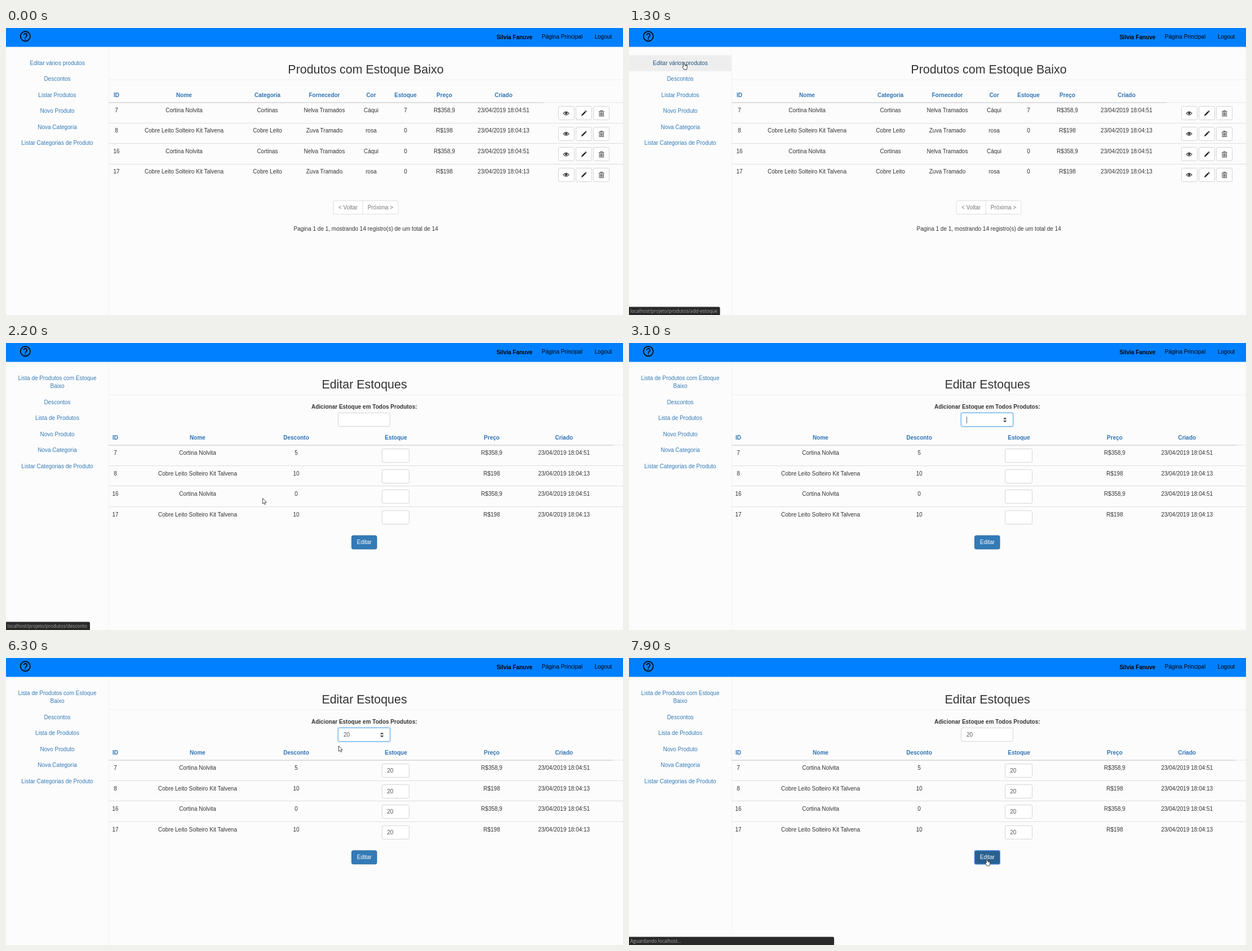
An HTML page that plays this animation: 1095 by 511 pixels, repeating every 8000 ms.

```html
<!DOCTYPE html>
<html lang="pt-BR">
<head>
<meta charset="utf-8">
<title>Estoque</title>
<style>
  html, body { margin: 0; width: 100%; height: 100%; overflow: hidden; background: #fcfcfc; }
  svg { display: block; }
  text { font: 10px "Liberation Sans", Arial, sans-serif; fill: #333; text-anchor: middle; }
  .bold { font-weight: bold; }
  .link { fill: #337ab7; }
  .head { font-weight: bold; fill: #2e74b5; }
  .nav { fill: #000; }
  .title { font-size: 21.43px; }
  .muted { fill: #777; }
  .value { fill: #555; }
  .left { text-anchor: start; }
  .status { font: 8.22px "Open Sans", "Noto Sans", sans-serif; fill: #a6a6a6; text-anchor: start; }
</style>
</head>
<body>
<svg id="stage" width="1095" height="511" viewBox="0 0 1095 511"></svg>
<script>
const LOOP = 8000, STEP = 100, PITCH = 36.5;
const stage = document.getElementById('stage');

function add(parent, tag, attrs, content) {
  const node = document.createElementNS('http://www.w3.org/2000/svg', tag);
  for (const key in attrs) node.setAttribute(key, attrs[key]);
  if (content !== undefined) node.textContent = content;
  parent.appendChild(node);
  return node;
}
const group = (parent, attrs = {}) => add(parent, 'g', attrs);
const rect = (parent, x, y, width, height, attrs) =>
  add(parent, 'rect', { x, y, width, height, ...attrs });
const path = (parent, d, attrs) => add(parent, 'path', { d, ...attrs });
// y is the middle of the capitals
const label = (parent, x, y, words, cls = '') =>
  add(parent, 'text', { x, y: y + 3.6, class: cls }, words);
const box = (parent, x, y, w, h, stroke = '#d4d4d4', fill = '#fff') =>
  rect(parent, x + .5, y + .5, w - 1, h - 1, { rx: 2.6, fill, stroke });
const show = (node, on) => node.setAttribute('opacity', Number(on));
const within = (n, from, to) => n >= from && n < to;

const curtain = 'Cortina Nolvita', quilt = 'Cobre Leito Solteiro Kit Talvena';
const goods = [
  { id: 7, name: curtain, stock: 7, off: 5 },
  { id: 8, name: quilt, stock: 0, off: 10 },
  { id: 16, name: curtain, stock: 0, off: 0 },
  { id: 17, name: quilt, stock: 0, off: 10 }
].map(item => Object.assign(item, item.name === curtain
  ? { kind: 'Cortinas', maker: 'Nelva Tramados', color: 'Cáqui', price: 'R$358,9', made: '23/04/2019 18:04:51' }
  : { kind: 'Cobre Leito', maker: 'Zuva Tramado', color: 'rosa', price: 'R$198', made: '23/04/2019 18:04:13' }));

function table(parent, cols, top, ruleEnd) {
  const rule = top + 13;
  rect(parent, 182, rule, 913, 1, { fill: '#e4e4e4' });
  rect(parent, 182, rule, ruleEnd - 182, 1.3, { fill: '#d4d4d4' });
  for (const [x, title] of cols) label(parent, x, top, title, 'head');
  goods.forEach((item, i) => {
    const y = top + 27 + i * PITCH;
    if (i) rect(parent, 182, Math.round(rule + i * PITCH), 913, 1, { fill: '#dedede' });
    for (const [x, , key] of cols) if (key) label(parent, x, y, item[key]);
  });
}

function menu(parent, items, y) {
  return items.map(words => {
    const node = label(parent, 91, y, words, 'link');
    y += 28.55;
    return node;
  });
}

function heading(parent, x, words) {
  add(parent, 'text', { x, y: 81.3, class: 'title' }, words);
}

function eye(parent, x, y) {
  const g = group(parent, { transform: `translate(${x} ${y})` });
  path(g, 'M-5 0Q0-6 5 0Q0 6-5 0Z', { fill: 'none', stroke: '#222', 'stroke-width': 1.1 });
  add(g, 'circle', { cy: -.3, r: 2.1, fill: '#222' });
  add(g, 'circle', { cx: -.6, cy: -1, r: .6, fill: '#fff' });
}
function pencil(parent, x, y) {
  const g = group(parent, { transform: `translate(${x} ${y}) rotate(45)`, fill: '#222' });
  path(g, 'M-1.3-6.2H1.3V-4.6H-1.3ZM-1.3-4H1.3V3.6L0 6.6L-1.3 3.6Z');
}
function trash(parent, x, y) {
  const g = group(parent, { transform: `translate(${x} ${y})`, fill: 'none', stroke: '#333' });
  path(g, 'M-4.8-3.3H4.8M-1.6-3.5V-5H1.6V-3.5M-3.7-2.5V5H3.7V-2.5M-1.5-1.8V3.8M0-1.8V3.8M1.5-1.8V3.8',
    { 'stroke-width': .9 });
}

// Frame shared by both pages
rect(stage, 0, 0, 1095, 511, { fill: '#fcfcfc' });
const hover = rect(stage, 0, 48.3, 182, 28.6, { fill: '#eee' });
rect(stage, 0, 0, 1095, 33.6, { fill: '#0080ff' });
rect(stage, 181.5, 34, 1, 477, { fill: '#f1f1f1' });
rect(stage, 182, 91.6, 913, 1, { fill: '#eee' });
add(stage, 'circle', { cx: 34.3, cy: 14.8, r: 8.6, fill: 'none', stroke: '#000', 'stroke-width': 1.7 });
path(stage, 'M31.4 12.8a2.9 2.9 0 1 1 4.9 2.1q-2 1.4-2 2.8M34.3 18.7v1.8',
  { fill: 'none', stroke: '#000', 'stroke-width': 1.7 });
label(stage, 902.4, 16.2, 'Silvia Fanuve', 'nav bold');
label(stage, 987, 15.2, 'Página Principal', 'nav');
label(stage, 1060, 15.2, 'Logout', 'nav');

// Low stock list
const list = group(stage);
heading(list, 638.5, 'Produtos com Estoque Baixo');
const firstLink = menu(list, ['Editar vários produtos', 'Descontos', 'Listar Produtos',
  'Novo Produto', 'Nova Categoria', 'Listar Categorias de Produto'], 62)[0];
table(list, [
  [196, 'ID', 'id'], [316, 'Nome', 'name'], [464, 'Categoria', 'kind'],
  [565, 'Fornecedor', 'maker'], [648, 'Cor', 'color'], [709, 'Estoque', 'stock'],
  [778, 'Preço', 'price'], [883, 'Criado', 'made']
], 119.2, 954);
goods.forEach((item, i) => {
  const y = 152 + i * PITCH;
  [eye, pencil, trash].forEach((icon, n) => {
    const x = 994 + n * 31.4;
    box(list, Math.round(x - 14.5), Math.round(y - 12.6), 29, 25);
    icon(list, x, y);
  });
});
box(list, 580.5, 307, 116, 25, '#ddd');
rect(list, 632.5, 307.5, 1, 24, { fill: '#ddd' });
label(list, 607, 319.6, '< Voltar', 'muted');
label(list, 664.5, 319.6, 'Próxima >', 'muted');
label(list, 638.7, 357.2, 'Pagina 1 de 1, mostrando 14 registro(s) de um total de 14');

// Stock form
const form = group(stage);
heading(form, 636, 'Editar Estoques');
label(form, 91, 62, 'Lista de Produtos com Estoque', 'link');
label(form, 91, 76.3, 'Baixo', 'link');
const offLink = menu(form, ['Descontos', 'Lista de Produtos', 'Novo Produto',
  'Nova Categoria', 'Listar Categorias de Produto'], 104.9)[0];
label(form, 635.8, 113.6, 'Adicionar Estoque em Todos Produtos:', 'bold');
table(form, [
  [194, 'ID', 'id'], [340, 'Nome', 'name'], [515, 'Desconto', 'off'], [692, 'Estoque'],
  [862, 'Preço', 'price'], [990.3, 'Criado', 'made']
], 168.4, 1077);
box(form, 589, 124, 93, 25);
const ring = group(form);
for (const [grow, alpha] of [[1.6, .12], [.8, .3]])
  rect(ring, 589.5 - grow, 124.5 - grow, 92 + 2 * grow, 24 + 2 * grow,
    { rx: 3.4, fill: 'none', stroke: '#66afe9', 'stroke-width': 1.2, 'stroke-opacity': alpha });
box(ring, 589, 124, 93, 25, '#66afe9');
const values = [label(form, 599, 136.4, '', 'value left')];
goods.forEach((item, i) => {
  const y = 188 + i * PITCH;
  box(form, 667, Math.round(y), 49, 25);
  values.push(label(form, 676.3, y + 12.4, '', 'value left'));
});
const spinner = path(form, 'M664 135.7L667.2 132.4L670.4 135.7ZM664 137.9H670.4L667.2 141.2Z', { fill: '#444' });
const caret = rect(form, 599, 131, 1, 12, { fill: '#666' });
const button = box(form, 613, 342.4, 45.5, 25, '#2e6da4', '#337ab7');
const outline = rect(form, 613.2, 342.9, 45.2, 24.2, { rx: 2.4, fill: 'none', stroke: '#5b9cf0', 'stroke-width': 1.3 });
label(form, 635.8, 354.8, 'Editar').style.fill = '#fff';

// Browser status bubble
const status = group(stage);
const bubble = rect(status, -4, 496.5, 100, 20, { rx: 2.5, fill: '#292929' });
const statusText = add(status, 'text', { x: 2.3, y: 507.4, class: 'status' }, '');

// Pointers
const arrow = path(stage, 'M.5.5V10.2L2.7 8.2L4.1 11.4L5.8 10.7L4.4 7.6H7.3Z',
  { fill: '#fff', stroke: '#222', 'stroke-width': .8 });
const hand = path(stage, 'M2.4 8.4V1.4a1 1 0 0 1 1.9 0V5l3.6.8a1.3 1.3 0 0 1 1 1.3V10L8 13.6H3.6L.6 9.2q-.4-1.1.6-1.2Z' +
  'M5.9 5.4V7.4M7.4 5.8V7.6', { fill: '#fff', stroke: '#111', 'stroke-width': .8 });

// [step, x, y, pointer]; each place holds until the next
const moves = [
  [0, 0, 0, null],
  [5, 574, 243, arrow], [6, 455, 158, arrow], [7, 290, 62, arrow],
  [8, 150, 5, arrow], [9, 102, 47, hand], [10, 94.3, 60.5, hand],
  [20, 112, 97, hand], [21, 262, 176, arrow], [22, 455, 276, arrow],
  [23, 556, 262, arrow], [24, 612, 205, arrow], [25, 632, 158, arrow], [26, 0, 0, null],
  [63, 590, 156, arrow], [64, 470, 208, arrow], [65, 386, 278, arrow],
  [66, 480, 338, arrow], [67, 606, 359, arrow], [68, 633, 357.6, hand],
  [70, 632.5, 357, hand], [71, 631.8, 356.4, hand]
];

const bubbles = [
  [12, 17, 161.5, 'localhost/projeto/produtos/add-estoque'],
  [17, 20, 364, 'Aguardando localhost...'],
  [20, 26, 149, 'localhost/projeto/produtos/desconto'],
  [79, 80, 364, 'Aguardando localhost...']
];

function draw(ms) {
  const n = Math.floor(ms / STEP);
  const onForm = n >= 17;
  show(list, !onForm);
  show(form, onForm);

  const overFirst = within(n, 9, 17), overOff = n === 20;
  show(hover, overFirst || overOff);
  hover.setAttribute('y', overOff ? 91 : 48.3);
  firstLink.style.fill = overFirst ? '#23527c' : '';
  offLink.style.fill = overOff ? '#23527c' : '';

  const typed = '20'.slice(0, Math.max(0, n - 54));
  for (const node of values) node.textContent = typed;
  show(ring, within(n, 30, 75) ? (n === 30 || n === 74 ? .5 : 1) : 0);
  show(spinner, within(n, 26, 74));
  show(caret, within(n, 30, 36) || within(n, 41, 46) || within(n, 52, 61) || within(n, 66, 71));
  caret.setAttribute('x', 599 + Math.round(typed.length * 5.2));

  const hot = n >= 68;
  button.setAttribute('fill', hot ? '#286090' : '#337ab7');
  button.setAttribute('stroke', hot ? '#204d74' : '#2e6da4');
  show(outline, n >= 74);

  const tip = bubbles.find(b => within(n, b[0], b[1]));
  show(status, tip ? (n === 12 || n === 25 ? .5 : 1) : 0);
  if (tip) {
    bubble.setAttribute('width', tip[2] + 4);
    statusText.textContent = tip[3];
  }

  const [, x, y, pointer] = moves.filter(m => m[0] <= n).pop();
  for (const p of [arrow, hand]) {
    show(p, p === pointer);
    p.setAttribute('transform', `translate(${x} ${y})`);
  }
}

const start = performance.now();
function tick() {
  draw((performance.now() - start) % LOOP);
  requestAnimationFrame(tick);
}
draw(0);
requestAnimationFrame(tick);
</script>
</body>
</html>
```
